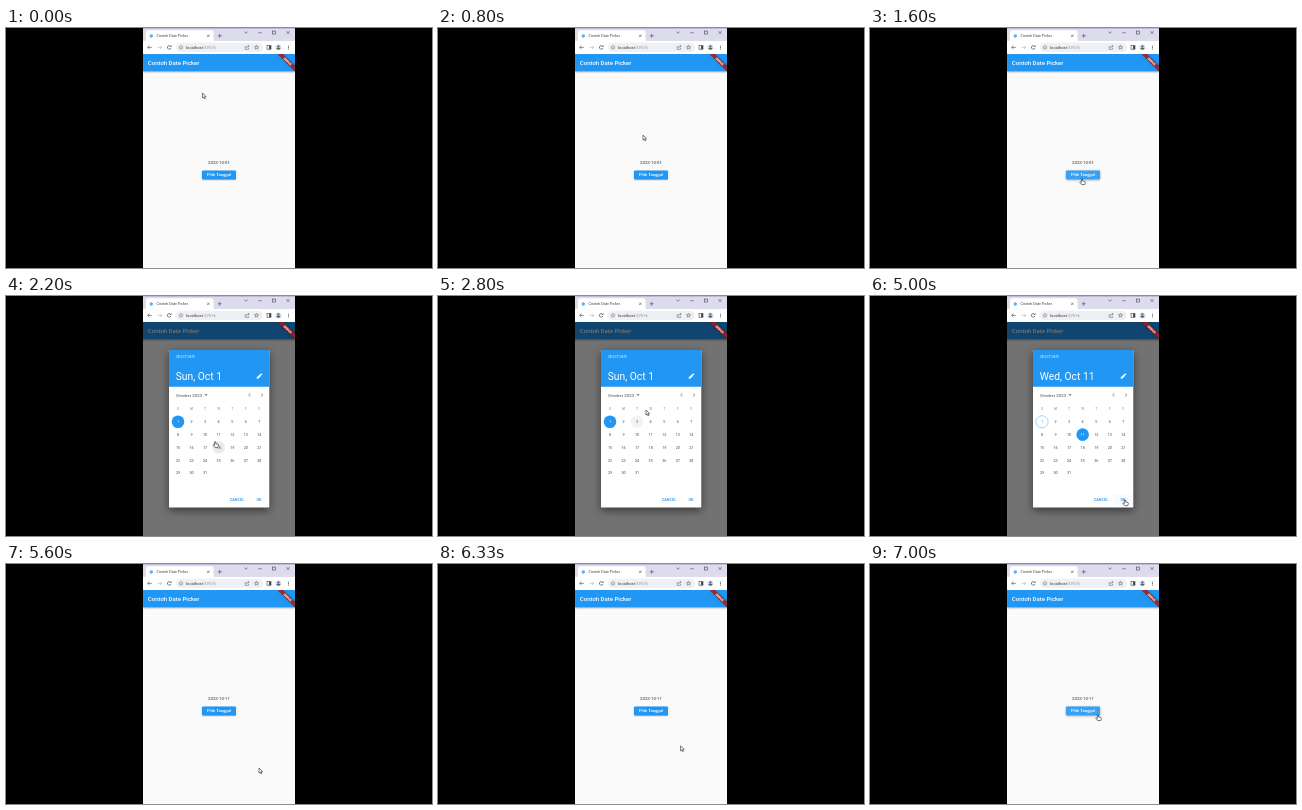
An HTML page with a canvas that plays this animation: 426x240 px, repeating every 7.07 s.

```html
<!DOCTYPE html>
<html lang="id">
<head>
<meta charset="utf-8">
<title>Contoh Date Picker</title>
<style>
html, body { margin: 0; width: 100%; height: 100%; overflow: hidden; background: #000; }
canvas { display: block; width: 426px; height: 240px; }
</style>
</head>
<body>
<canvas id="stage"></canvas>
<script>
const W = 426, H = 240, LOOP = 7070, STEP = 1000 / 15;
const LEFT = 137, RIGHT = 289, BLUE = '#2196f3', INK = '#4a4d52';
const canvas = document.getElementById('stage');
const ctx = canvas.getContext('2d');
const ratio = window.devicePixelRatio || 1;
canvas.width = W * ratio;
canvas.height = H * ratio;

const OPEN = 1950, PICK_4 = 3330, PICK_11 = 4400, CLOSE = 5200;
// time, x, y of the pointer tip
const PATH = [
  [0, 196.5, 65], [400, 196.5, 65], [900, 206, 112], [1300, 212, 151], [2050, 212, 151],
  [2550, 199, 127], [2680, 200, 125], [2800, 208, 114], [3150, 213, 127], [3500, 213, 127],
  [3850, 216, 139], [4000, 219, 140], [4250, 214, 139], [4500, 214, 139],
  [5000, 255, 204], [5300, 255, 204], [5450, 253, 204], [6000, 253, 204], [6750, 228, 151], [7070, 228, 151]
];

const clamp = v => Math.max(0, Math.min(1, v));
const ease = v => v * v * (3 - 2 * v);

function pointer(t) {
  const i = Math.max(1, PATH.findIndex(p => p[0] >= t));
  const a = PATH[i - 1], b = PATH[i];
  const k = ease(clamp((t - a[0]) / (b[0] - a[0])));
  return [a[1] + (b[1] - a[1]) * k, a[2] + (b[2] - a[2]) * k];
}

const dialogShown = t => t >= OPEN && t < CLOSE;
const dialogAlpha = t => ease(clamp((t - OPEN) / 180)) * (1 - ease(clamp((t - CLOSE) / 180)));
const dayX = d => 172 + 13.55 * ((d - 1) % 7);
const dayY = d => 125.8 + 12.8 * Math.floor((d - 1) / 7);
const selectedDay = t => t < PICK_4 ? 1 : t < PICK_11 ? 4 : 11;

// What lies below the pointer: a day number, 'button', 'ok' or nothing
function target(t) {
  const [x, y] = pointer(t);
  if (!dialogShown(t)) return x > 196 && x < 230 && y > 142 && y < 152 ? 'button' : 0;
  if (x > 246 && x < 261 && y > 198 && y < 209) return 'ok';
  const col = Math.round((x - 172) / 13.55), row = Math.round((y - 125.8) / 12.8);
  const d = row * 7 + col + 1;
  return col >= 0 && col < 7 && row >= 0 && d <= 31 ? d : 0;
}

// Average over the recent past gives a soft fade in and out
function hover(t, what) {
  let n = 0;
  for (let i = 0; i < 5; i++) n += target(Math.max(0, t - i * 45)) === what;
  return n / 5;
}

function rect(x, y, w, h, fill, r = 0) {
  ctx.fillStyle = fill;
  ctx.beginPath();
  ctx.roundRect(x, y, w, h, r);
  ctx.fill();
}

function disc(x, y, r, fill) {
  ctx.fillStyle = fill;
  ctx.beginPath();
  ctx.arc(x, y, r, 0, 7);
  ctx.fill();
}

function ring(x, y, r, color, width = 0.5, from = 0, to = 7) {
  ctx.strokeStyle = color;
  ctx.lineWidth = width;
  ctx.beginPath();
  ctx.arc(x, y, r, from, to);
  ctx.stroke();
}

function line(points, color = INK, width = 0.65) {
  ctx.strokeStyle = color;
  ctx.lineWidth = width;
  ctx.beginPath();
  points.forEach(p => ctx.lineTo(p[0], p[1]));
  ctx.stroke();
}

function poly(points, fill) {
  ctx.fillStyle = fill;
  ctx.beginPath();
  points.forEach(p => ctx.lineTo(p[0], p[1]));
  ctx.fill();
}

function text(s, x, y, size, color, align = 'left', weight = 400) {
  ctx.font = `${weight} ${size}px Roboto, sans-serif`;
  ctx.textAlign = align;
  ctx.textBaseline = 'alphabetic';
  ctx.fillStyle = color;
  ctx.fillText(s, x, y + size * 0.355);
}

function shadow(blur, dy, alpha) {
  ctx.shadowColor = `rgba(0,0,0,${alpha})`;
  ctx.shadowBlur = blur * ratio;
  ctx.shadowOffsetY = dy * ratio;
}

function noShadow() {
  ctx.shadowColor = 'transparent';
}

function arrow(x, y, dir, color) {
  line([[x - 2, y], [x + 2, y]], color);
  line([[x + dir * 0.2, y - 1.8], [x + dir * 2, y], [x + dir * 0.2, y + 1.8]], color);
}

function cross(x, y, r, color = INK, width = 0.6) {
  line([[x - r, y - r], [x + r, y + r]], color, width);
  line([[x - r, y + r], [x + r, y - r]], color, width);
}

function star(x, y, r) {
  const pts = [];
  for (let i = 0; i <= 10; i++) {
    const a = Math.PI * (i / 5 - 0.5), q = i % 2 ? r * 0.45 : r;
    pts.push([x + q * Math.cos(a), y + q * Math.sin(a)]);
  }
  line(pts, INK, 0.5);
}

function browser() {
  rect(LEFT, 0, RIGHT - LEFT, 14, '#dcdcec');
  rect(LEFT, 0, RIGHT - LEFT, 0.8, '#b9acd2');
  rect(140, 2.2, 67.5, 14, '#fff', 2.5);
  rect(LEFT, 13, RIGHT - LEFT, 13, '#fff');
  disc(145.3, 8, 1.7, '#54b4f4');
  text('Contoh Date Picker', 150.5, 7.9, 3.7, '#3c4043');
  cross(202.3, 7.8, 1.2);
  line([[211.8, 7.8], [215.6, 7.8]]);
  line([[213.7, 5.9], [213.7, 9.7]]);
  line([[238.4, 3.8], [240, 5.2], [241.6, 3.8]]);
  line([[252.2, 4.8], [255.6, 4.8]]);
  ctx.strokeRect(266.6, 3.1, 2.9, 2.9);
  cross(282, 4.6, 1.5);

  arrow(143.7, 19.4, -1, INK);
  arrow(153.7, 19.4, 1, '#b4b7bb');
  ring(163.2, 19.4, 1.8, INK, 0.7, 0.3, 5.5);
  poly([[163.7, 18.9], [165.4, 18.9], [165.4, 17.1]], INK);
  rect(170, 14.8, 87, 9.3, '#eef0f3', 4.6);
  ring(175, 19.4, 1.7, '#5f6368');
  line([[175, 19], [175, 20.4]], '#5f6368', 0.5);
  text('localhost', 180, 19.4, 4.2, '#33363a');
  const w = ctx.measureText('localhost').width;
  text(':57616', 180 + w, 19.4, 4.2, '#8d9197');
  line([[239.6, 18.5], [239.2, 18.5], [239.2, 21.3], [242.6, 21.3], [242.6, 20.2]], INK, 0.5);
  line([[240.4, 20], [241, 18.4], [243, 18.2]], INK, 0.5);
  line([[242, 17.1], [243.2, 18.2], [242, 19.3]], INK, 0.5);
  star(250.5, 19.4, 2.2);
  ctx.lineWidth = 0.65;
  ctx.strokeRect(261, 17.4, 4, 3.8);
  rect(263, 17.4, 2, 3.8, INK);
  disc(272.4, 19.4, 2.9, '#d3dbe6');
  disc(272.4, 18.4, 1.1, '#53627a');
  rect(270.5, 19.8, 3.8, 1.6, '#53627a', 0.8);
  for (let i = -1; i < 2; i++) disc(282.5, 19.4 + i * 1.5, 0.5, INK);
}

function page(t) {
  rect(LEFT, 26, RIGHT - LEFT, H - 26, '#fafafa');
  shadow(2, 0.8, 0.35);
  rect(LEFT, 26, RIGHT - LEFT, 17.2, BLUE);
  noShadow();
  text('Contoh Date Picker', 141.8, 34.8, 6, '#fff', 'left', 500);
  text(t < CLOSE ? '2023-10-01' : '2023-10-11', 213, 134, 4.35, '#333', 'center');
  const h = hover(t, 'button');
  shadow(1.5 + h, 0.6, 0.4);
  rect(196, 142.6, 34, 8.7, BLUE, 1);
  noShadow();
  rect(196, 142.6, 34, 8.7, `rgba(255,255,255,${0.1 * h})`, 1);
  const press = clamp((t - OPEN + 180) / 180);
  if (press > 0 && t < OPEN + 150) {
    ctx.save();
    ctx.beginPath();
    ctx.rect(196, 142.6, 34, 8.7);
    ctx.clip();
    disc(212, 149, 20 * press, 'rgba(255,255,255,0.22)');
    ctx.restore();
  }
  text('Pilih Tanggal', 213, 147, 4.2, '#fff', 'center', 500);
}

function pencil(x, y) {
  ctx.save();
  ctx.translate(x, y);
  ctx.rotate(-Math.PI / 4);
  poly([[-3.6, 0], [-2.6, -1], [1.8, -1], [1.8, 1], [-2.6, 1]], '#fff');
  rect(2.2, -1, 1.3, 2, '#fff', 0.3);
  ctx.restore();
}

function dialog(t) {
  const grey = '#6b6b6b', day = selectedDay(t);
  shadow(8, 3, 0.5);
  rect(163, 54, 100.3, 157.6, '#fff', 1.2);
  noShadow();
  rect(163, 54, 100.3, 36.8, BLUE, [1.2, 1.2, 0, 0]);
  text('SELECT DATE', 170, 60.6, 3.1, '#e4f2fe');
  text((day === 1 ? 'Sun' : 'Wed') + ', Oct ' + day, 169.7, 80.6, 10.3, '#fff');
  pencil(253.3, 80.3);

  text('October 2023', 170, 99, 4.3, grey, 'left', 500);
  poly([[198.4, 98.3], [201.6, 98.3], [200, 100]], grey);
  line([[244.3, 97.3], [242.7, 99], [244.3, 100.7]], grey, 0.7);
  line([[255.2, 97.3], [256.8, 99], [255.2, 100.7]], grey, 0.7);
  [...'SMTWTFS'].forEach((c, i) => text(c, dayX(i + 1), 113, 3.4, '#8c8c8c', 'center'));

  for (let d = 1; d <= 31; d++) {
    const x = dayX(d), y = dayY(d), h = hover(t, d);
    if (d === day) disc(x, y, 6.3, BLUE);
    else if (d === 1) ring(x, y, 6.1, BLUE, 0.4);
    if (h && d !== day) disc(x, y, 6.3, `rgba(70,80,100,${0.12 * h})`);
    const color = d === day ? '#fff' : d === 1 ? BLUE : '#444';
    text(d, x, y, 3.7, color, 'center');
  }

  const h = hover(t, 'ok');
  if (h) rect(243.5, 198.6, 19, 10.6, `rgba(33,150,243,${0.06 * h})`, 1);
  text('CANCEL', 231, 204, 3.8, BLUE, 'center', 500);
  text('OK', 253, 204, 3.8, BLUE, 'center', 500);
}

function banner() {
  ctx.save();
  ctx.beginPath();
  ctx.rect(LEFT, 26, RIGHT - LEFT, H);
  ctx.clip();
  ctx.translate(RIGHT, 26);
  ctx.rotate(Math.PI / 4);
  shadow(1.8, 0, 0.5);
  rect(-12.2, 8.5, 24.4, 3.7, 'rgba(183,28,28,0.8)');
  noShadow();
  text('DEBUG', 0, 10.4, 3.1, '#fff', 'center', 900);
  ctx.restore();
}

function cursor(t) {
  const [x, y] = pointer(t);
  ctx.save();
  ctx.translate(x, y);
  ctx.lineJoin = 'round';
  ctx.lineWidth = 0.6;
  ctx.strokeStyle = '#222';
  ctx.fillStyle = '#fff';
  const shape = target(t)
    ? [[-0.6, 0], [0.5, 0], [0.6, 2], [3, 2.5], [3.4, 3.2], [2.8, 5.6], [-0.3, 5.6], [-2.2, 3.4], [-1.7, 2.8], [-0.6, 3.5]]
    : [[0, 0], [0, 5], [1.2, 4], [2, 5.8], [2.8, 5.4], [2.1, 3.7], [3.6, 3.6]];
  ctx.beginPath();
  shape.forEach(p => ctx.lineTo(p[0], p[1]));
  ctx.closePath();
  ctx.fill();
  ctx.stroke();
  ctx.restore();
}

function draw(t) {
  ctx.setTransform(ratio, 0, 0, ratio, 0, 0);
  ctx.globalAlpha = 1;
  rect(0, 0, W, H, '#000');
  ctx.save();
  ctx.beginPath();
  ctx.rect(LEFT, 0, RIGHT - LEFT, H);
  ctx.clip();
  page(t);
  browser();
  const a = dialogAlpha(t);
  if (a > 0) {
    rect(LEFT, 26, RIGHT - LEFT, H - 26, `rgba(0,0,0,${0.54 * a})`);
    ctx.globalAlpha = a;
    dialog(t);
    ctx.globalAlpha = 1;
  }
  banner();
  cursor(t);
  ctx.restore();
}

const start = performance.now();
function tick() {
  const t = (performance.now() - start) % LOOP;
  draw(Math.floor((t + 4) / STEP) * STEP);
  requestAnimationFrame(tick);
}
tick();
</script>
</body>
</html>
```
